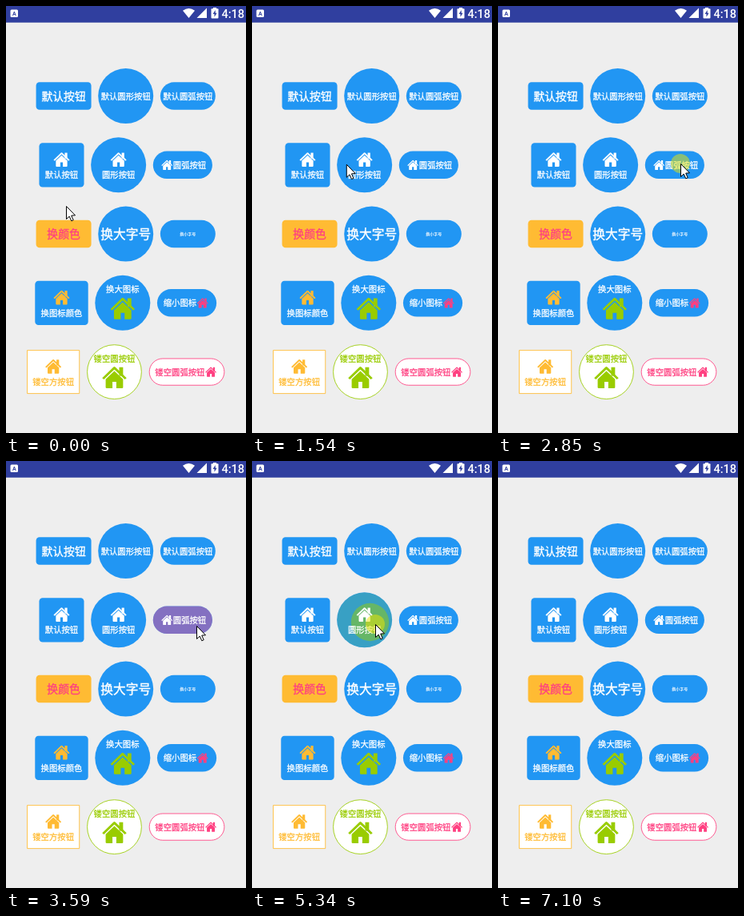
These frames come from a looping animation (300x534 px, 7380 ms). An HTML page with a canvas:

```html
<!DOCTYPE html>
<html lang="zh-CN">
<head>
<meta charset="utf-8">
<title>Buttons</title>
<style>
html, body { margin: 0; width: 100%; height: 100%; overflow: hidden; background: #eee; }
canvas { display: block; width: 300px; height: 534px; }
</style>
</head>
<body>
<canvas id="stage"></canvas>
<script>
const W = 300, H = 534, LOOP = 7380;
const DP = 0.8625; // buttons are laid out in dp, scaled to pixels
const GAP = 10, ROW_STEP = 100, ROW_X = 149.7 / DP, ROW_Y = 112.6 / DP;
const BLUE = '#2196f3', ORANGE = '#ffbb33', GREEN = '#99cc00', PINK = '#ff4081', WHITE = '#fff';
const BAR = '#303f9f';
const CJK = '"Noto Sans CJK SC", "Noto Sans CJK", sans-serif';

const canvas = document.getElementById('stage');
const ctx = canvas.getContext('2d');
const dpr = window.devicePixelRatio || 1;
canvas.width = W * dpr;
canvas.height = H * dpr;

const clamp = v => Math.max(0, Math.min(1, v));
const mix = (a, b, p) => a + (b - a) * p;

const base = { w: 80, h: 40, r: 5, fill: BLUE, size: 12, color: WHITE, textX: 0, textY: 0 };
const outline = color => ({ fill: WHITE, color, iconColor: color, line: color });

const rect = (label, opts) => ({ ...base, label, size: 16, ...opts });
const pill = (label, opts) => ({ ...base, label, r: 20, ...opts });
const disc = (label, opts) => ({ ...base, label, h: 80, r: 40, ...opts });

// Icon above the label
const stacked = { icon: 23, iconX: 0, iconY: -8, textY: 14.3 };
// Large icon below the label
const flipped = { icon: 35, iconX: 0, iconY: 8, textY: -19.5 };

const iconRect = (label, opts) =>
  rect(label, { ...stacked, size: 12, w: 12 * label.length + 17, h: 64, ...opts });

// side is -1 for an icon on the left, 1 on the right
const iconPill = (label, side, opts) => pill(label, {
  w: 12 * label.length + 38, icon: 16, iconY: 0,
  iconX: side * (6 * label.length - 1.2), textX: side * -10, ...opts
});

const square = iconRect('默认按钮');
const round = disc('圆形按钮', stacked);
const capsule = iconPill('圆弧按钮', -1);

const rows = [
  [rect('默认按钮'), disc('默认圆形按钮'), pill('默认圆弧按钮')],
  [square, round, capsule],
  [rect('换颜色', { fill: ORANGE, color: PINK }), disc('换大字号', { size: 18.2 }), pill('换小字号', { size: 5.8 })],
  [iconRect('换图标颜色', { iconColor: ORANGE }), disc('换大图标', { ...flipped, iconColor: GREEN }),
    iconPill('缩小图标', 1, { iconColor: PINK })],
  [iconRect('镂空方按钮', { ...outline(ORANGE), r: 0 }), disc('镂空圆按钮', { ...flipped, ...outline(GREEN) }),
    iconPill('镂空圆弧按钮', 1, outline(PINK))]
];

// Each row is centred
rows.forEach((row, i) => {
  const width = row.reduce((sum, b) => sum + b.w, GAP * (row.length - 1));
  let x = ROW_X - width / 2;
  for (const b of row) {
    b.cx = x + b.w / 2;
    b.cy = ROW_Y + i * ROW_STEP;
    x += b.w + GAP;
  }
});

// Finger down, finger up, ripple gone
const press = (button, color, down, up, end) => ({ button, color, down, up, end });
const presses = [
  press(square, ORANGE, 560, 900, 1450),
  press(round, GREEN, 1600, 2150, 2850),
  press(capsule, PINK, 2800, 3310, 3980),
  press(capsule, PINK, 4110, 4470, 5010),
  press(round, GREEN, 5060, 5550, 6150),
  press(square, ORANGE, 6300, 6480, 6560)
];
const DELAY = 150, SPREAD = 270;

// Pointer moves: start, end, destination
const home = [75, 250];
const moves = [
  [30, 130, 54, 206], [360, 520, 45, 194], [1000, 1580, 123, 198], [2400, 2800, 228, 197],
  [3350, 3580, 238, 206], [3900, 4100, 241, 206.5], [4600, 5050, 154, 204],
  [5750, 6270, 55, 198], [6300, 6340, 61, 197], [6640, 7090, 278, 533]
];

function pointerAt(t) {
  let [x, y] = home;
  for (const [start, end, toX, toY] of moves) {
    const p = clamp((t - start) / (end - start));
    x = mix(x, toX, p);
    y = mix(y, toY, p);
  }
  return [x, y];
}

function poly(points) {
  ctx.beginPath();
  points.forEach(([x, y]) => ctx.lineTo(x, y));
  ctx.closePath();
  ctx.fill();
}

function circle(x, y, r) {
  ctx.beginPath();
  ctx.arc(x, y, r, 0, Math.PI * 2);
  ctx.fill();
}

function roundBox(x, y, w, h, r) {
  ctx.beginPath();
  ctx.roundRect(x, y, w, h, r);
}

function drawHouse(x, y, size, color) {
  ctx.save();
  ctx.translate(x, y);
  ctx.scale(size / 100, size * 0.9 / 100);
  ctx.fillStyle = ctx.strokeStyle = color;
  ctx.fillRect(20, -47, 16, 40);
  ctx.lineWidth = 10;
  ctx.lineJoin = 'round';
  ctx.beginPath();
  ctx.moveTo(-47, 6);
  ctx.lineTo(0, -44);
  ctx.lineTo(47, 6);
  ctx.stroke();
  const half = [[0, -29], [36, 8], [36, 47], [33, 50], [8, 50], [8, 20]];
  poly([...half, ...half.slice(1).reverse().map(([px, py]) => [-px, py])]);
  ctx.restore();
}

function drawLabel(b) {
  ctx.font = `${b.size}px ${CJK}`;
  ctx.textAlign = 'center';
  ctx.fillStyle = ctx.strokeStyle = b.color;
  ctx.lineWidth = b.size * 0.025;
  const x = b.cx + b.textX, y = b.cy + b.textY + b.size * 0.38;
  ctx.fillText(b.label, x, y);
  ctx.strokeText(b.label, x, y);
}

function drawRipple({ button: b, color, down, up, end }, t) {
  const start = down + DELAY;
  if (t < start || t > end) return;
  const p = clamp((t - start) / SPREAD);
  const fade = 1 - clamp((t - up) / (end - up));
  const [x, y] = pointerAt(down).map(v => v / DP);
  ctx.save();
  ctx.clip();
  ctx.fillStyle = color;
  ctx.globalAlpha = 0.4 * p * fade;
  ctx.fill();
  ctx.globalAlpha = 0.48 * fade;
  circle(mix(x, b.cx, p), mix(y, b.cy, p), Math.hypot(b.w, b.h) / 2 * p);
  ctx.restore();
}

function drawButton(b, t) {
  const inset = b.line ? 0.7 : 0;
  const shape = () => roundBox(b.cx - b.w / 2 + inset, b.cy - b.h / 2 + inset,
    b.w - 2 * inset, b.h - 2 * inset, Math.max(0, b.r - inset));
  shape();
  ctx.fillStyle = b.fill;
  ctx.fill();
  if (b.line) {
    ctx.strokeStyle = b.line;
    ctx.lineWidth = 1;
    ctx.stroke();
  }
  for (const p of presses.filter(p => p.button === b)) {
    shape();
    drawRipple(p, t);
  }
  if (b.icon) drawHouse(b.cx + b.iconX, b.cy + b.iconY, b.icon, b.iconColor || WHITE);
  drawLabel(b);
}

function drawStatusBar() {
  ctx.fillStyle = BAR;
  ctx.fillRect(0, 0, W, 24 * DP);
  ctx.fillStyle = WHITE;
  roundBox(5.5, 4.5, 9.5, 9.5, 1.5);
  ctx.fill();
  // Wi-Fi fan
  ctx.beginPath();
  ctx.moveTo(228.5, 15);
  ctx.lineTo(221, 5.8);
  ctx.quadraticCurveTo(228.5, 0.2, 236, 5.8);
  ctx.fill();
  // Signal
  poly([[251, 2.5], [251, 15], [238.5, 15]]);
  // Battery
  ctx.fillRect(259, 2, 4, 2);
  roundBox(256.5, 3.2, 9, 12.3, 1);
  ctx.fill();
  ctx.fillStyle = BAR;
  poly([[261.7, 5], [258.6, 10], [260.5, 10], [260.5, 13.8], [263.6, 8.7], [261.7, 8.7]]);
  ctx.font = 'bold 7px Roboto, sans-serif';
  ctx.textAlign = 'center';
  ctx.fillText('A', 10.25, 11.8);
  ctx.fillStyle = WHITE;
  ctx.font = '500 14.5px Roboto, sans-serif';
  ctx.textAlign = 'right';
  ctx.fillText('4:18', 298, 14.6);
}

function drawPointer(t) {
  if (t >= moves[moves.length - 1][1]) return;
  const [x, y] = pointerAt(t);
  if (presses.some(p => t >= p.down && t < p.up)) {
    ctx.fillStyle = 'rgba(240, 230, 0, 0.5)';
    circle(x, y, 12);
  }
  ctx.save();
  ctx.translate(x + 0.5, y + 0.5);
  ctx.fillStyle = WHITE;
  poly([[0, 0], [0, 16], [3.7, 12.6], [6.3, 18.3], [8.7, 17.2], [6.2, 11.6], [11, 11.3]]);
  ctx.strokeStyle = '#000';
  ctx.lineWidth = 1;
  ctx.stroke();
  ctx.restore();
}

function draw(t) {
  ctx.setTransform(dpr, 0, 0, dpr, 0, 0);
  ctx.fillStyle = '#eee';
  ctx.fillRect(0, 0, W, H);
  drawStatusBar();
  ctx.save();
  ctx.scale(DP, DP);
  rows.flat().forEach(b => drawButton(b, t));
  ctx.restore();
  drawPointer(t);
}

const begin = performance.now();
function tick() {
  draw((performance.now() - begin) % LOOP);
  requestAnimationFrame(tick);
}
tick();
</script>
</body>
</html>
```
